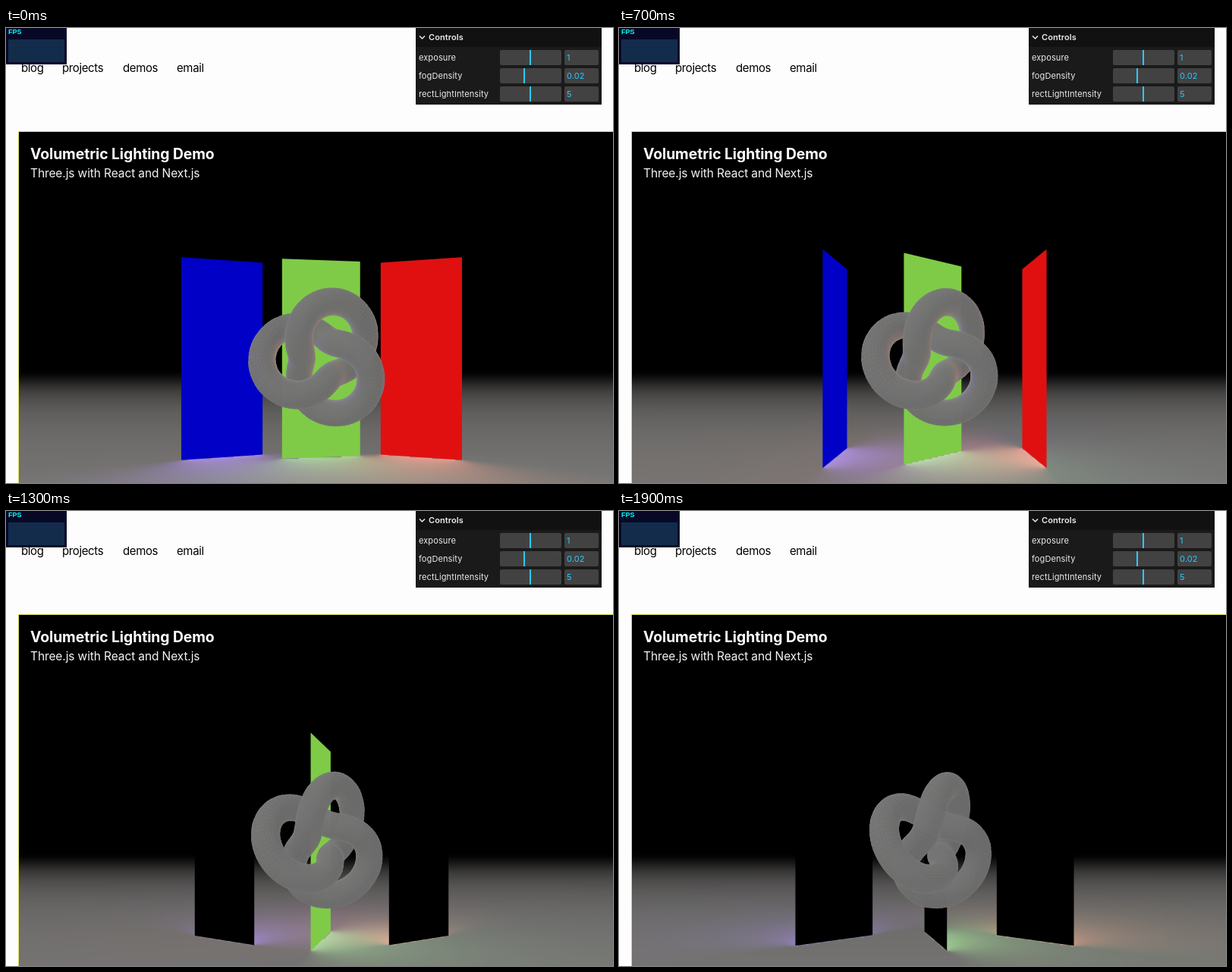
These frames come from a looping animation (800x600 px, 2000 ms). An HTML page with a canvas:

```html
<!DOCTYPE html>
<html lang="en">
<head>
<meta charset="utf-8">
<title>Volumetric Lighting Demo</title>
<style>
  html, body { margin: 0; width: 100%; height: 100%; overflow: hidden; background: #fdfdfd; }
  body { position: relative; font-family: Inter, sans-serif; }
  canvas { position: absolute; left: 0; top: 0; }
  nav a, .title, .subtitle { position: absolute; white-space: nowrap; line-height: 20px; }
  nav a { top: 43px; font-size: 15px; letter-spacing: -.025em; color: #000; }
  .title { left: 32px; top: 156px; font-size: 19.4px; font-weight: 700; letter-spacing: -.1px; color: #fff; }
  .subtitle { left: 32px; top: 182px; font-size: 15.5px; letter-spacing: -.11px; color: #f4f4f4; }
  .fps { position: absolute; left: 0; top: 0; width: 80px; height: 48px; background: #080826;
    font: bold 9px/11px "Liberation Sans", sans-serif; color: #0ff; text-indent: 3px; }
  .fps i { position: absolute; left: 3px; top: 15px; width: 74px; height: 30px; background: #132c4c; }
  .gui { position: absolute; left: 540px; top: 0; width: 245px; height: 101px; background: #1b1a1a;
    font-size: 11px; letter-spacing: .1px; color: #ebebeb; }
  .gui header { height: 25px; line-height: 25px; padding-left: 17px; font-weight: 600; background: #111; }
  .gui svg { position: absolute; left: 4px; top: 8px; }
  .row { position: absolute; left: 4px; width: 237px; height: 20px; line-height: 20px; }
  .row b { position: absolute; left: 107px; width: 81px; height: 20px; background: #424242; border-radius: 2px; }
  .row b i { position: absolute; width: 2px; height: 20px; background: #2cc9ff; }
  .row u { position: absolute; left: 192px; width: 42px; height: 20px; line-height: 21px; padding-left: 3px;
    background: #424242; border-radius: 2px; color: #2cc9ff; text-decoration: none; }
</style>
</head>
<body>
<canvas id="stage" width="800" height="600"></canvas>
<nav>
  <a style="left:20px">blog</a><a style="left:74px">projects</a>
  <a style="left:154px">demos</a><a style="left:225px">email</a>
</nav>
<div class="title">Volumetric Lighting Demo</div>
<div class="subtitle">Three.js with React and Next.js</div>
<div class="fps">FPS<i></i></div>
<div class="gui">
  <header>Controls</header>
  <svg width="9" height="9"><path d="M1 2.5 4.5 6 8 2.5" fill="none" stroke="#ebebeb" stroke-width="1.5"/></svg>
  <div class="row" style="top:29px">exposure<b><i style="left:39px"></i></b><u>1</u></div>
  <div class="row" style="top:53px">fogDensity<b><i style="left:31px"></i></b><u>0.02</u></div>
  <div class="row" style="top:77px">rectLightIntensity<b><i style="left:39px"></i></b><u>5</u></div>
</div>
<script>
const ctx = document.getElementById('stage').getContext('2d');
const LEFT = 16, TOP = 136, CX = 416, CY = 436;
const FOCAL = 300 / Math.tan(Math.PI / 6), CAM = 15, HALF_HEIGHT = 5;
const LOOP = 2000, STEP = 100, INTENSITY = 2.8;

// Scene units: knot at the origin, camera at z = -CAM looking along +z, floor at y = -5.
const project = (x, y, z) => {
  const s = FOCAL / (CAM + z);
  return [CX - x * s, CY - y * s];
};
const fog = depth => Math.exp(-((0.02 * depth) ** 2));
const toByte = v => 255 * Math.min(1, v) ** (1 / 2.2);
const dot = (a, b) => a[0] * b[0] + a[1] * b[1] + a[2] * b[2];
const cross = (a, b) => [a[1] * b[2] - a[2] * b[1], a[2] * b[0] - a[0] * b[2], a[0] * b[1] - a[1] * b[0]];
const unit = a => { const l = Math.hypot(...a); return a.map(v => v / l); };

// turn is relative to the spin of the side panels.
const panels = [
  { x: 5, turn: 1, fill: '#0000c6', glow: [.18, .09, .46] },
  { x: 0, turn: .5, fill: '#7fcb47', glow: [.16, .4, .12] },
  { x: -5, turn: -1, fill: '#e01011', glow: [.52, .14, .09] }
];
const KNOT_TURN = .2;

const spinKeys = [[0, 16.2], [700, 86.8], [1100, 130.3], [2000, 223.2]];
function spinAt(t) {
  const i = spinKeys.findIndex(k => t < k[0]);
  const [t0, a0] = spinKeys[i - 1], [t1, a1] = spinKeys[i];
  return (a0 + (a1 - a0) * (t - t0) / (t1 - t0)) * Math.PI / 180;
}

function placePanel(p, spin) {
  const angle = p.turn * spin, c = Math.cos(angle), s = Math.sin(angle);
  p.ax = p.x + 2 * c; p.az = 5 - 2 * s;
  p.bx = p.x - 2 * c; p.bz = 5 + 2 * s;
  p.normal = [-s, 0, -c];
  p.samples = [];
  for (const k of [-1, 1]) for (const y of [-3.3, 0, 3.3])
    p.samples.push([p.x + k * c, y, 5 - k * s]);
}

// Positive when the point lies on the emitting side.
const side = (p, x, z) => (p.ax - x) * (p.bz - z) - (p.az - z) * (p.bx - x);

// Exact form factor of an upright rectangle standing on the floor.
function floorFactor(p, x, z) {
  const c = side(p, x, z);
  if (c <= 0) return 0;
  const h = 2 * HALF_HEIGHT;
  const d = (p.ax - x) * (p.bx - x) + (p.az - z) * (p.bz - z);
  const m = Math.hypot(c, h * 4);
  return (Math.atan2(c, d) - c / m * Math.atan2(m, d + h * h)) / (2 * Math.PI);
}

const floor = document.createElement('canvas');
floor.width = 392; floor.height = 82;
const floorCtx = floor.getContext('2d');
const floorImage = floorCtx.createImageData(floor.width, floor.height);

function drawFloor() {
  const data = floorImage.data;
  let o = 0;
  for (let j = 0; j < floor.height; j++) {
    const depth = FOCAL * HALF_HEIGHT / (2 * j + 1), haze = fog(depth);
    for (let i = 0; i < floor.width; i++) {
      const x = (CX - LEFT - 2 * i - 1) * depth / FOCAL;
      const light = [.195, .19, .185];
      if (haze > .01) for (const p of panels) {
        const f = floorFactor(p, x, depth - CAM) * INTENSITY;
        for (let k = 0; k < 3; k++) light[k] += f * p.glow[k];
      }
      for (let k = 0; k < 3; k++) data[o++] = toByte(light[k] * haze);
      data[o++] = 255;
    }
  }
  floorCtx.putImageData(floorImage, 0, 0);
  ctx.drawImage(floor, LEFT, CY, 784, 164);
}

function drawPolygon(points, fill) {
  ctx.beginPath();
  for (const q of points) ctx.lineTo(q[0], q[1]);
  ctx.closePath();
  ctx.fillStyle = fill;
  ctx.fill();
}

function drawPanel(p) {
  drawPolygon([
    project(p.ax, HALF_HEIGHT, p.az), project(p.bx, HALF_HEIGHT, p.bz),
    project(p.bx, -HALF_HEIGHT, p.bz), project(p.ax, -HALF_HEIGHT, p.az)
  ], side(p, 0, -CAM) > 0 ? p.fill : '#000');
}

const ALONG = 220, AROUND = 28, TUBE = .5;
const knotCurve = u => {
  const r = .75 * (2 + Math.cos(1.5 * u));
  return [r * Math.cos(u), r * Math.sin(u), .75 * Math.sin(1.5 * u)];
};
const knot = [];
for (let i = 0; i < ALONG; i++) {
  const u = i / ALONG * 4 * Math.PI, p = knotCurve(u), q = knotCurve(u + .01);
  const tangent = q.map((v, k) => v - p[k]);
  const b = unit(cross(tangent, p.map((v, k) => v + q[k])));
  const n = unit(cross(b, tangent));
  for (let j = 0; j < AROUND; j++) {
    const v = j / AROUND * 2 * Math.PI, c = Math.cos(v), s = Math.sin(v);
    const normal = n.map((w, k) => w * c + b[k] * s);
    knot.push({ normal, point: p.map((w, k) => w + TUBE * normal[k]) });
  }
}
const SKY_LIGHT = unit([.6, .7, -.4]);

function shade(point, normal, facing) {
  const base = .17 + .035 * Math.max(0, dot(normal, SKY_LIGHT)) + .06 * (1 - facing) ** 5;
  const light = [base * 1.01, base, base * .99];
  for (const p of panels) {
    let f = 0;
    for (const s of p.samples) {
      const d = s.map((v, k) => v - point[k]);
      const emit = -dot(d, p.normal), receive = dot(d, normal);
      if (emit > 0 && receive > 0) f += emit * receive / dot(d, d) ** 2;
    }
    f *= 40 / 6 / Math.PI * INTENSITY;
    for (let k = 0; k < 3; k++) light[k] += f * p.glow[k];
  }
  const haze = fog(CAM + point[2]);
  return `rgb(${light.map(v => Math.round(toByte(v * haze)))})`;
}

function drawKnot(angle) {
  const c = Math.cos(angle), s = Math.sin(angle);
  const rotate = ([x, y, z]) => [x * c + z * s, y, z * c - x * s];
  const verts = knot.map(v => {
    const point = rotate(v.point);
    return { point, normal: rotate(v.normal), screen: project(...point) };
  });
  const faces = [];
  for (let i = 0; i < ALONG; i++) for (let j = 0; j < AROUND; j++) {
    const i2 = (i + 1) % ALONG, j2 = (j + 1) % AROUND;
    const quad = [[i, j], [i2, j], [i2, j2], [i, j2]].map(([a, b]) => verts[a * AROUND + b]);
    const mean = key => [0, 1, 2].map(k => quad.reduce((sum, v) => sum + v[key][k], 0) / 4);
    const point = mean('point'), normal = unit(mean('normal'));
    const facing = dot(normal, unit([-point[0], -point[1], -CAM - point[2]]));
    if (facing > 0) faces.push({ quad, point, normal, facing });
  }
  faces.sort((a, b) => b.point[2] - a.point[2]);
  ctx.lineWidth = .7;
  for (const f of faces) {
    const color = shade(f.point, f.normal, f.facing);
    drawPolygon(f.quad.map(v => v.screen), color);
    ctx.strokeStyle = color;
    ctx.stroke();
  }
}

function drawScene(t) {
  const spin = spinAt(t);
  for (const p of panels) placePanel(p, spin);
  ctx.fillStyle = '#000';
  ctx.fillRect(LEFT, TOP, 784, 464);
  drawFloor();
  panels.forEach(drawPanel);
  drawKnot(KNOT_TURN * spin);
  // Pale yellow hairline along the top and left of the viewport.
  ctx.fillStyle = '#e6e45c';
  ctx.fillRect(LEFT, TOP, 784, 1);
  ctx.fillRect(LEFT, TOP, 1, 464);
}

let shown = -1;
function tick() {
  const t = Math.floor(performance.now() % LOOP / STEP) * STEP;
  if (t !== shown) drawScene(shown = t);
  requestAnimationFrame(tick);
}
tick();
</script>
</body>
</html>
```
